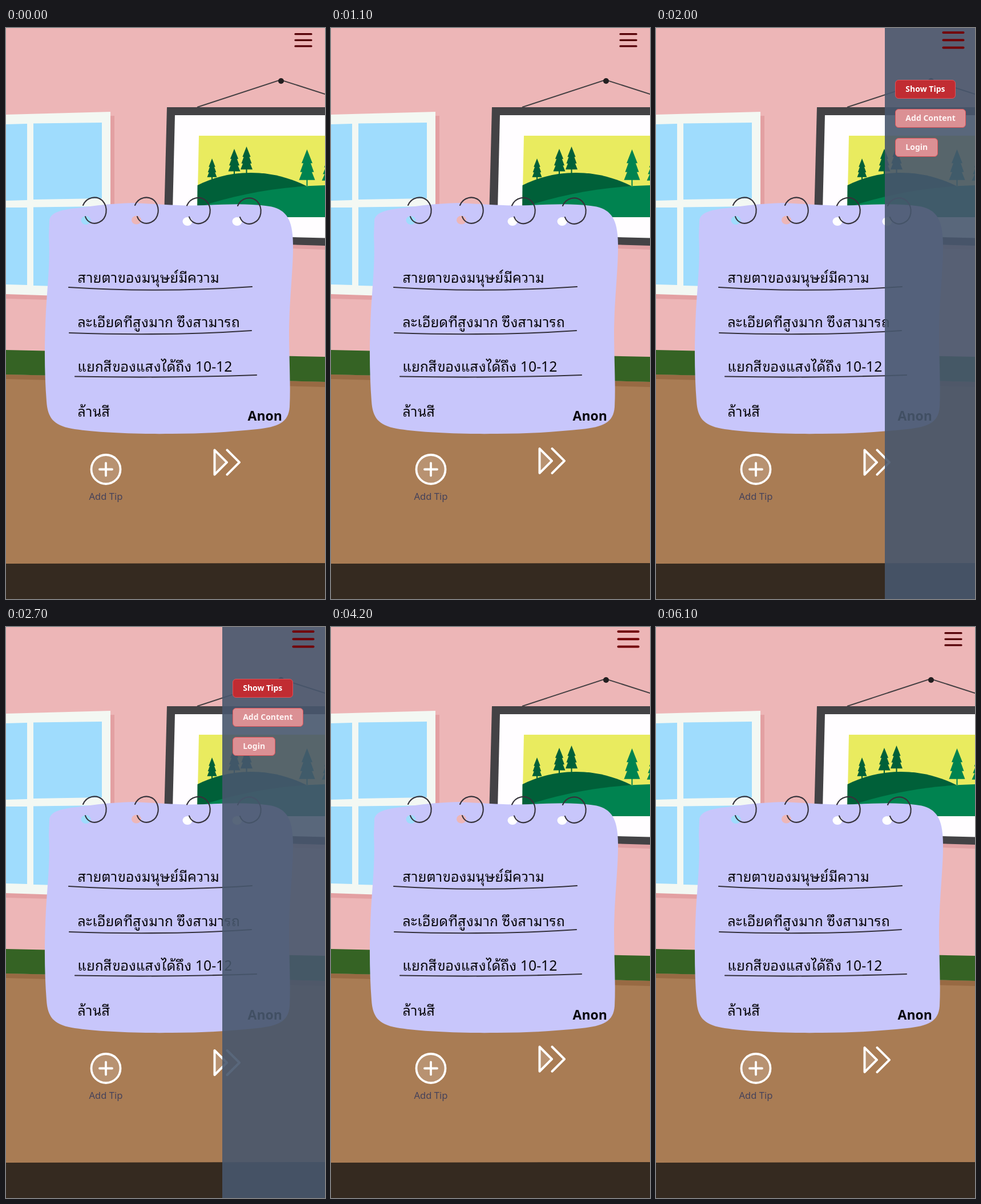
Recreate the animation shown at these times as an HTML page. Size 559 by 1002 pixels, loop 6200 ms.

```html
<!DOCTYPE html>
<html lang="th">
<head>
<meta charset="utf-8">
<title>Tips</title>
<style>
  html, body { margin: 0; width: 100%; height: 100%; overflow: hidden; background: #edb6b7; }
  body { position: relative; font-family: "Noto Sans", "Open Sans", sans-serif; }
  svg { position: absolute; left: 0; top: 0; width: 559px; height: 1002px; display: block; }
  .thai {
    font: 24.8px "Noto Sans Thai Looped", "Noto Looped Thai", "Noto Sans", "Noto Sans Thai", sans-serif;
    fill: #09080d; text-rendering: optimizeLegibility;
  }
  #panel {
    position: absolute; right: 0; top: 0; height: 1002px; overflow: hidden;
    box-sizing: border-box; background: rgba(71, 87, 109, .9);
  }
  #list {
    box-sizing: border-box; width: 100%; padding: 90.6px 0 0 18px;
    display: flex; flex-direction: column; align-items: flex-start; gap: 17.4px;
  }
  #list div {
    box-sizing: border-box; padding: 4.6px 17.2px; border: 1.5px solid #df5459; border-radius: 6px;
    background: #db9094; color: #fff4f4; font-size: 14px; font-weight: 700; line-height: 22.4px;
  }
  #list div:first-child { background: #c12c32; color: #fff; }
</style>
</head>
<body>
<svg viewBox="0 0 559 1002">
  <rect width="559" height="1002" fill="#edb6b7"/>

  <!-- skirting and floor -->
  <path d="M0 608L559 621V1002H0Z" fill="#a97c54"/>
  <path d="M0 608L559 621V630L0 616Z" fill="#986a43"/>
  <path d="M0 565L559 577V621L0 608Z" fill="#356324"/>
  <path d="M0 940L559 939V1002H0Z" fill="#352a20"/>

  <!-- window -->
  <path d="M0 160L190 154V480L0 475Z" fill="#e3a0a2"/>
  <path d="M0 152L183 147V473L0 467Z" fill="#f3f8f3"/>
  <path d="M0 169L37 168V302L0 303ZM48 167.500L168 166V299L48 301ZM0 315H37V451L0 450ZM48 314.500L168 313V455L48 452Z" fill="#9fdcfd"/>

  <!-- picture -->
  <path d="M300 380L559 389V375H300Z" fill="#e0a0a3"/>
  <path d="M335 139L481 91L559 116" fill="none" stroke="#454043" stroke-width="2"/>
  <circle cx="482" cy="93" r="5" fill="#231f20"/>
  <path d="M282 139H559V382L276 373Z" fill="#434245"/>
  <path d="M296 153H559V368.500L291 362Z" fill="#fffdff"/>
  <path d="M338 189H559V332H335Z" fill="#e9eb5f"/>
  <path d="M335.500 276C385 251 455 242 526 277V332H335Z" fill="#006039"/>
  <path d="M335 315C410 290 480 278 559 276V332H335Z" fill="#008350"/>
  <g id="trees"></g>

  <!-- note -->
  <path d="M76 338C77 325 94 319 124 316C160 311 185 308 222 307C260 308 300 313 350 311C390 309 425 308 455 312C484 315 499 328 502 362C506 400 497 465 496 530C496 580 499 625 497 665C495 693 476 700 440 704C390 709 345 712 290 712C220 713 150 709 115 703C83 697 73 684 71 655C68 615 67 570 69 520C71 460 78 420 75 365Z" fill="#c8c6fb"/>
  <g id="rings" fill="none" stroke="#35323a" stroke-width="2.100" stroke-linecap="round"></g>
  <g fill="none" stroke="#34313c" stroke-width="2.200" stroke-linecap="round">
    <path d="M110 455Q270 465 431 454"/>
    <path d="M111 535Q285 541 430 531"/>
    <path d="M121 611.500Q285 614.500 439 609"/>
  </g>
  <g class="thai">
    <text x="125.500" y="446.500">สายตาของมนุษย์มีความ</text>
    <text x="125.500" y="525">ละเอียดที่สูงมาก ซึ่งสามารถ</text>
    <text x="125.500" y="603">แยกสีของแสงได้ถึง 10-12</text>
    <text x="125.500" y="681.500">ล้านสี</text>
  </g>
  <text x="453.700" y="689" text-anchor="middle" font-size="23" font-weight="700" fill="#09080d">Anon</text>

  <!-- actions -->
  <g stroke="#fff" stroke-linecap="round" stroke-linejoin="round" fill="#fff" fill-opacity=".17">
    <circle cx="175" cy="774.500" r="25.500" stroke-width="3.800"/>
    <path d="M164 774.500H186M175 763.500V785.500" stroke-width="3.800"/>
    <g id="next" stroke-width="4">
      <path d="M365.500 -21.500V21.500L387 0Z"/>
      <path d="M387.500 -21.500L409 0L387.500 21.500" fill="none"/>
    </g>
  </g>
  <text x="175" y="827.500" text-anchor="middle" font-size="16.600" fill="#45425a">Add Tip</text>
</svg>

<div id="panel"><div id="list"><div>Show Tips</div><div>Add Content</div><div>Login</div></div></div>

<svg viewBox="0 0 559 1002">
  <path id="menu" d="M-14 -10.600H14M-14 0H14M-14 10.600H14" fill="none" stroke-width="3.300" stroke-linecap="round"/>
</svg>

<script>
const LOOP = 6200, STEP = 100;
const $ = id => document.getElementById(id);
const clamp = v => Math.min(1, Math.max(0, v));

function bezier(x1, y1, x2, y2) {
  const at = (a, b, s) => 3 * a * s * (1 - s) ** 2 + 3 * b * s * s * (1 - s) + s ** 3;
  return x => {
    let lo = 0, hi = 1;
    for (let i = 0; i < 24; i++) {
      const mid = (lo + hi) / 2;
      if (at(x1, x2, mid) < x) lo = mid; else hi = mid;
    }
    return at(y1, y2, lo);
  };
}
const ease = bezier(.25, .1, .25, 1);
const fall = bezier(.8, 0, 1, 1);
const rise = bezier(0, 0, .2, 1);
const ramp = (t, start, length) => ease(clamp((t - start) / length));

// Three stacked tiers on a short trunk
function tree(x, top, foot, width, color) {
  const h = foot - top, w = width / 2;
  const tier = (a, b, k) => `M${x} ${top + h * a}L${x + w * k} ${top + h * b}H${x - w * k}Z`;
  return `<path fill="${color}" d="${tier(0, .38, .68)}${tier(.1, .62, .86)}${tier(.28, .84, 1)}M${x - 1} ${top + h * .8}h2V${foot}h-2Z"/>`;
}
$("trees").innerHTML =
  tree(361, 229, 268, 17, "#006039") + tree(400, 212, 259, 21, "#006039") +
  tree(421.5, 208, 256, 21, "#006039") + tree(527.5, 213, 277, 28, "#008350") +
  tree(566, 225, 276, 25, "#008350");

const ring = (x, y, holeX, holeY, color) =>
  `<ellipse cx="${holeX}" cy="${holeY}" rx="8.5" ry="7.5" fill="${color}" stroke="none"/>` +
  `<path d="M${x - 20} ${y - 10}C${x - 14} ${y - 24} ${x + 3} ${y - 28} ${x + 14} ${y - 18}C${x + 25} ${y - 6} ${x + 22} ${y + 14} ${x + 8} ${y + 20}C${x - 3} ${y + 25} ${x - 13} ${y + 19} ${x - 16} ${y + 10}"/>`;
$("rings").innerHTML =
  ring(155, 321, 140, 337.5, "#9fdcfd") + ring(246, 321, 228.5, 337, "#edb6b7") +
  ring(337, 321.5, 318, 339.5, "#fff") + ring(426, 322, 405, 339.5, "#fff");

function draw(t) {
  // bounce: lowest point 820 ms into each second
  const p = ((t + 180) % 1000) / 500;
  const lift = p < 1 ? rise(p) : 1 - fall(p - 1);
  $("next").setAttribute("transform", `translate(0 ${773.3 - 15.6 * lift})`);

  const width = 180 * (ramp(t, 1706, 500) - ramp(t, 3734, 500));
  $("panel").style.width = width + "px";

  const hover = ramp(t, 1300, 200) - ramp(t, 4500, 200);
  $("menu").setAttribute("transform", `translate(521 21.3) scale(${1 + .25 * hover})`);
  $("menu").setAttribute("stroke", `rgb(${84 + 30 * hover},0,6)`);
}

const begin = performance.now();
function tick() {
  const t = (performance.now() - begin) % LOOP;
  draw(Math.floor(t / STEP) * STEP);
  requestAnimationFrame(tick);
}
draw(0);
requestAnimationFrame(tick);
</script>
</body>
</html>
```
